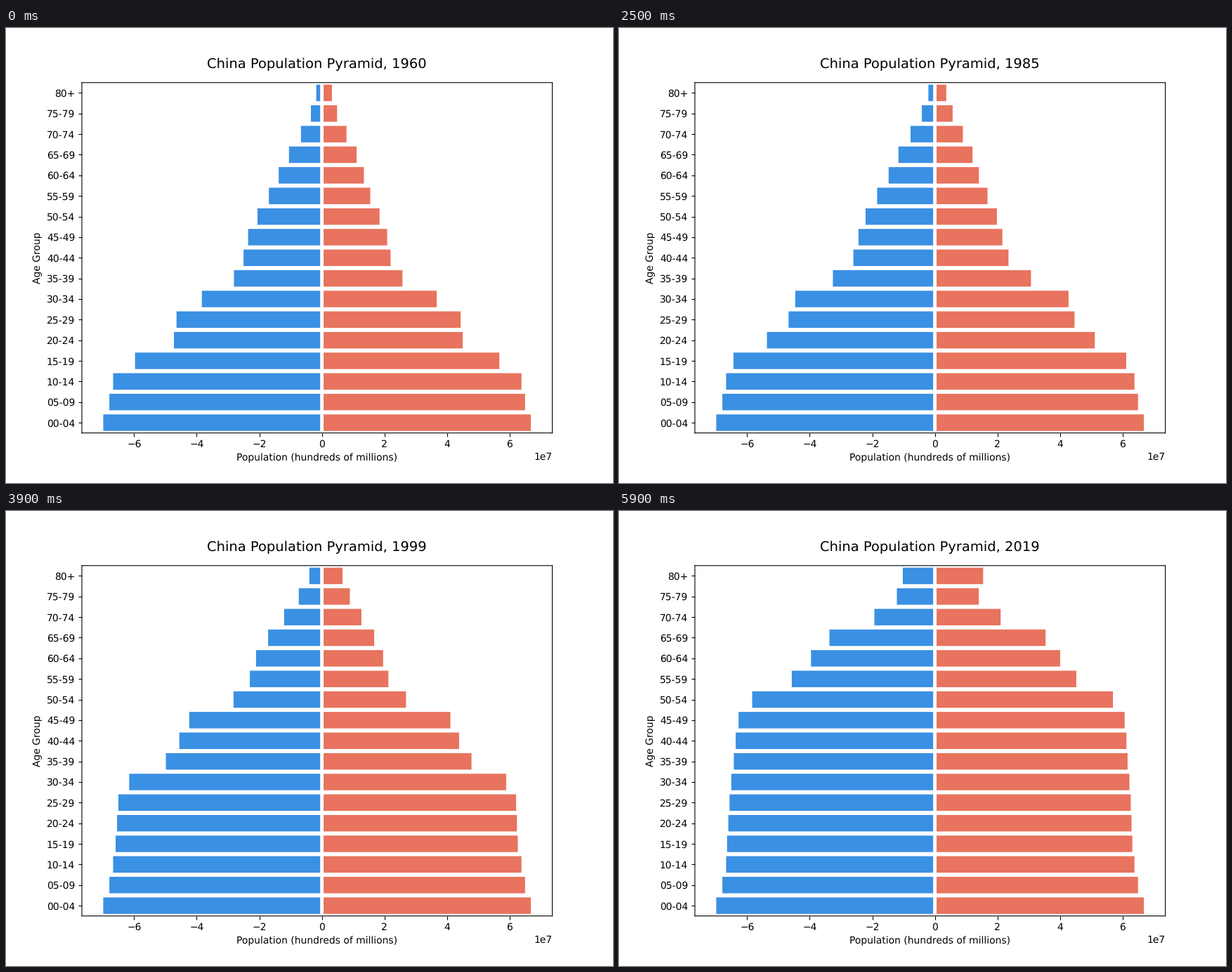
Animation of 864x648 px, one loop 6 s. Source, as a matplotlib script:

```python
import numpy as np
import matplotlib.pyplot as plt
from matplotlib.animation import FuncAnimation

plt.rcParams.update({"path.snap": False, "text.hinting": "none"})

START, END, HOLD = 1960, 2019, 1982
AGES = [f"{a:02d}-{a + 4:02d}" for a in range(0, 80, 5)] + ["80+"]
CHILDREN = np.array([69.85, 67.9, 66.7])  # peak sizes in millions
ADULT = np.arange(3, 16)                  # rows 15-19 to 75-79


def cohort(born):
    """Millions of men who reach fifteen, by year of birth."""
    return np.interp(
        born,
        [1907, 1912, 1919, 1924, 1929, 1934, 1939, 1944, 1949, 1954, 1957,
         1962, 1964, 1967, 1971, 1986, 1990, 2005],
        [8.9, 11.7, 16.1, 17.8, 20.5, 23.8, 25.8, 26.2, 30.7, 44.8, 47.1,
         47.6, 51.2, 59.7, 65.9, 65.5, 66.4, 60])


def women_per_man(born):
    return np.interp(born, [1907, 1927, 1942, 1952], [1, 0.87, 0.865, 0.95])


def survival(year):
    """Share of men still alive in each adult row; mortality eases with time."""
    hazard = np.maximum(0.007, 0.31 * np.exp(0.47 * (ADULT - 15)))
    hazard[0] = 0
    return np.cumprod(1 - hazard) ** (1 - 0.006 * max(0, year - 1990))


def pyramid(year):
    """Sizes of all age groups in one year, men then women."""
    born, alive, t = year - 5 * ADULT, survival(year), year - HOLD
    men = cohort(born) * alive
    women = cohort(born) * women_per_man(born) * alive ** 0.65
    return [np.r_[CHILDREN, men, 1.8 * np.exp(0.047 * t)],
            np.r_[0.956 * CHILDREN, women, 3.2 * np.exp(0.0425 * t)]]


# Bars never shrink: each shows the largest size so far.
years = np.maximum(np.arange(START, END + 1), HOLD)
peaks = np.maximum.accumulate([pyramid(y) for y in years]) * 1e6
peaks[:, 0] *= -1

fig, ax = plt.subplots(figsize=(8.64, 6.48), dpi=100)
rows = np.arange(len(AGES))
sides = [ax.barh(rows, sizes, color=color, linewidth=0)
         for sizes, color in zip(peaks[0], ("#3a90e3", "#e8735e"))]
ax.axvline(0, color="white", linewidth=3.5)

ax.set_xlim(-7.668e7, 7.362e7)
ax.set_ylim(-0.5, len(AGES) - 0.5)
ax.set_yticks(rows, AGES)
ax.set_xlabel("Population (hundreds of millions)")
ax.set_ylabel("Age Group")
title = ax.set_title("", fontsize=14, pad=15)


def update(i):
    title.set_text(f"China Population Pyramid, {START + i}")
    for bars, sizes in zip(sides, peaks[i]):
        for bar, size in zip(bars, sizes):
            bar.set_width(size)
    return [title, *sides[0], *sides[1]]


anim = FuncAnimation(fig, update, frames=END - START + 1, interval=100,
                     repeat=True, repeat_delay=0)
plt.show()
```
